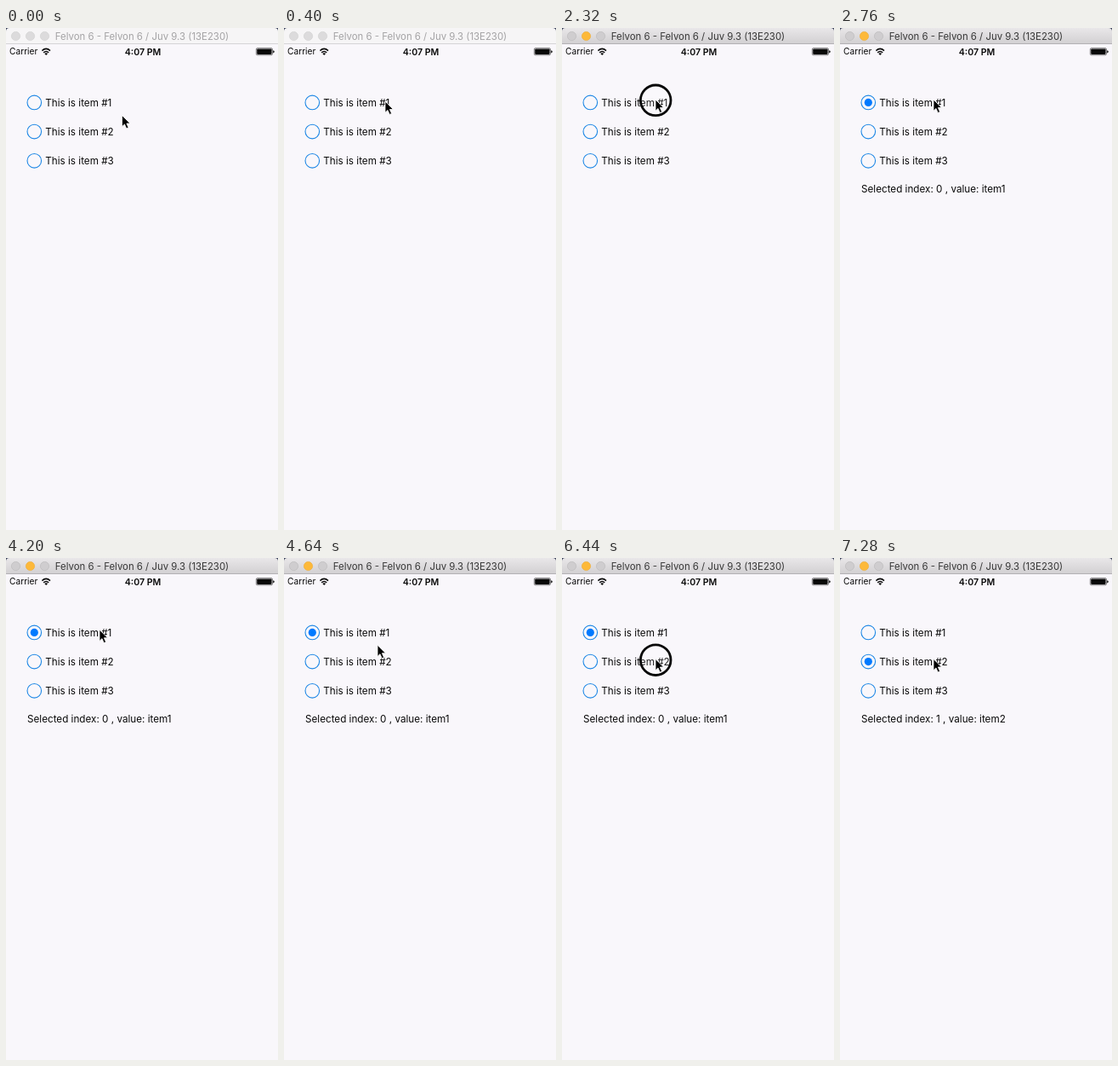
An HTML page for the animation above (8 s loop, 320 px wide and 589 px high).

```html
<!DOCTYPE html>
<html lang="en">
<head>
<meta charset="utf-8">
<title>Radio buttons</title>
<style>
  html, body { margin: 0; width: 100%; height: 100%; overflow: hidden; background: #f9f7fb; }
  svg { display: block; width: 320px; height: 589px; font: 11.7px Inter, Roboto, sans-serif; fill: #080808; }
  .title { font-size: 11.4px; }
  .status { font-size: 10.2px; }
  .clock { font-size: 10.6px; font-weight: 600; text-anchor: middle; }
  .radio { fill: none; stroke: #1f88e5; stroke-width: 1.1; }
  .dot { fill: #007aff; }
</style>
</head>
<body>
<svg viewBox="0 0 320 589">
  <defs>
    <linearGradient id="active" x2="0" y2="1">
      <stop stop-color="#e9e7e9"/><stop offset="1" stop-color="#d1cfd1"/>
    </linearGradient>
  </defs>
  <rect width="320" height="589" fill="#f9f7fb"/>

  <rect width="320" height="19" fill="#3a4059"/>
  <path id="bar" d="M0 19V4Q0 0 4 0H316Q320 0 320 4V19Z"/>
  <path id="edge" d="M0 18.5H320"/>
  <g id="lights">
    <circle cx="11.5" cy="9.5" r="5.1"/>
    <circle cx="28.5" cy="9.5" r="5.1"/>
    <circle cx="45.5" cy="9.5" r="5.1"/>
  </g>
  <text id="title" class="title" x="57.8" y="13.7">Felvon 6 - Felvon 6 / Juv 9.3 (13E230)</text>

  <text class="status" x="4" y="31.3">Carrier</text>
  <path d="M42.4 26.6Q47.2 22.2 52 26.6M44.2 28.9Q47.2 26.1 50.2 28.9" fill="none" stroke="#080808" stroke-width="1.5"/>
  <path d="M45.3 30.1Q47.2 28.6 49.1 30.1L47.2 32.1Z"/>
  <text class="clock" x="161" y="31.5">4:07 PM</text>
  <rect x="294.3" y="23.6" width="19.2" height="8.2" rx="1.5" fill="none" stroke="#080808" stroke-width=".5"/>
  <rect x="295.2" y="24.5" width="17.4" height="6.4" rx=".8"/>
  <path d="M314.2 26.2Q315.8 26.4 315.8 27.8T314.2 29.4Z"/>

  <g id="items"></g>
  <text id="result" x="25" y="192.8"></text>

  <circle id="ring" cx="110.2" r="17.8" fill="#f9f7fb" fill-opacity=".1" stroke="#080808" stroke-width="2.8"/>
  <path id="cursor" d="M0 0V13.2L3 10.4L5.2 15.4L7.6 14.4L5.4 9.5H9.5Z"
        fill="#000" stroke="#fff" stroke-width=".8" stroke-linejoin="round"/>
</svg>
<script>
const LOOP = 8000;
const $ = id => document.getElementById(id);

$('items').innerHTML = [1, 2, 3].map(n => {
  const y = 53.2 + 34.2 * n;
  return `<circle class="radio" cx="33.3" cy="${y}" r="8.3"/>
    <circle class="dot" cx="33.3" cy="${y}" r="4.6"/>
    <text x="46.3" y="${y + 4.3}">This is item #${n}</text>`;
}).join('');
const dots = document.querySelectorAll('.dot');

// Pointer moves: start, end, destination x and y
const moves = [
  [0, 400, 119, 86],
  [520, 1000, 110, 84],
  [4160, 5000, 110, 114],
  [5000, 5600, 110, 118.5]
];
const ease = p => p * p * (3 - 2 * p);

function pointer(t) {
  let x = 136.5, y = 102.5;
  for (const [from, to, endX, endY] of moves) {
    const p = ease(Math.min(1, Math.max(0, (t - from) / (to - from))));
    x += (endX - x) * p;
    y += (endY - y) * p;
  }
  return [x, y];
}

function paintWindow(active) {
  $('bar').setAttribute('fill', active ? 'url(#active)' : '#f6f5f6');
  $('edge').setAttribute('stroke', active ? '#b3b1b4' : '#d5d4d6');
  $('title').setAttribute('fill', active ? '#383838' : '#a4a3a5');
  [...$('lights').children].forEach((light, i) => {
    const yellow = active && i === 1;
    light.setAttribute('fill', yellow ? '#fdb93a' : active ? '#cfcdcf' : '#dcdbdc');
    light.setAttribute('stroke', yellow ? '#eeac38' : active ? '#bcbabc' : '#d2d1d2');
    light.setAttribute('stroke-width', .7);
  });
}

function draw(t) {
  paintWindow(t >= 2240);

  const selected = t < 2760 ? -1 : t < 7120 ? 0 : 1;
  dots.forEach((dot, i) => dot.style.display = i === selected ? '' : 'none');
  $('result').textContent = selected < 0 ? '' : `Selected index: ${selected} , value: item${selected + 1}`;

  const first = t >= 2240 && t < 2600;
  const second = t >= 6440 && t < 6960;
  $('ring').style.display = first || second ? '' : 'none';
  $('ring').setAttribute('cy', first ? 84.8 : 119.7);

  $('cursor').setAttribute('transform', `translate(${pointer(t)})`);
}

const start = performance.now();
function tick() {
  draw((performance.now() - start) % LOOP);
  requestAnimationFrame(tick);
}
tick();
</script>
</body>
</html>
```
